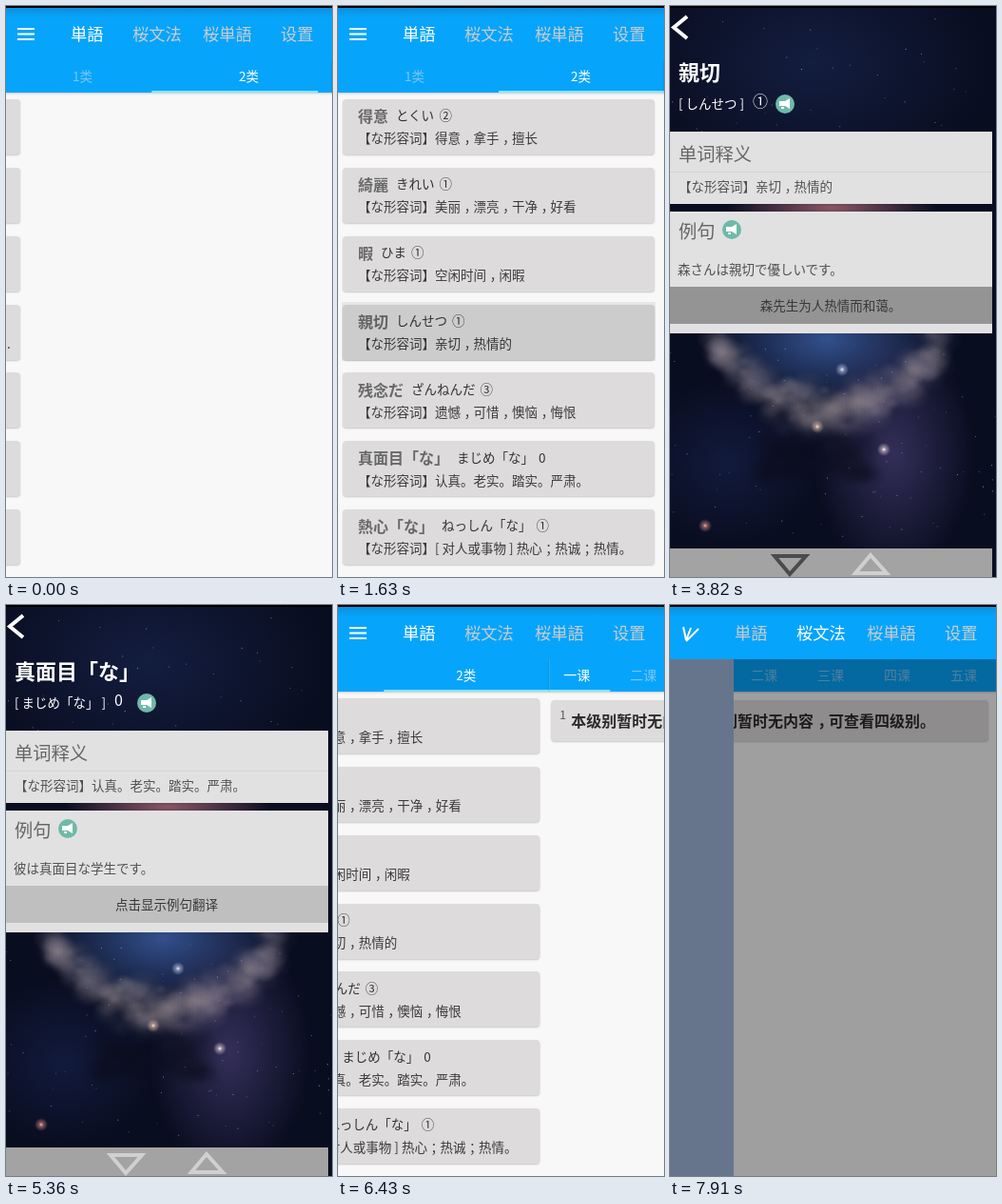
These frames come from a looping animation (343 by 600 pixels, 8000 ms). An HTML page with a canvas:

```html
<!DOCTYPE html>
<html lang="zh">
<head>
<meta charset="utf-8">
<title>Vocabulary app</title>
<style>
html, body { margin: 0; width: 100%; height: 100%; overflow: hidden; background: #f8f8f8; }
body { position: relative; font-family: "Noto Sans CJK SC", "Noto Sans CJK JP", "Noto Sans CJK", sans-serif; }
div, svg, canvas { position: absolute; }
.page { left: 0; top: 0; width: 343px; height: 600px; }
.t { white-space: pre; line-height: 20px; }
.t i { font-style: normal; position: relative; left: .27em; }
.bar { left: 0; width: 343px; background: #07a4fb; }
.card { background: #dddbdc; border-radius: 4px; box-shadow: 0 1px 2px #0003; }
.line { top: 89px; height: 2px; background: #86e6ff; }
.panel { left: 0; width: 339px; background: #e2e1e2; }
</style>
</head>
<body>
<script>
const STEPS = [0, 120, 270, 390, 550, 1630, 1940, 2090, 2240, 2360, 2520, 2790, 2910, 3030, 3150,
  3270, 3420, 3820, 4090, 4370, 4800, 5360, 5630, 5750, 5880, 6000, 6310, 6430, 6550, 6670, 6790,
  6940, 7090, 7360, 7640, 7790, 7910];
const LOOP = 8000, W = 343;
const ROWS = [
  ['得意', 'とくい', '②', '得意，拿手，擅长'],
  ['綺麗', 'きれい', '①', '美丽，漂亮，干净，好看'],
  ['暇', 'ひま', '①', '空闲时间，闲暇'],
  ['親切', 'しんせつ', '①', '亲切，热情的'],
  ['残念だ', 'ざんねんだ', '③', '遗憾，可惜，懊恼，悔恨'],
  ['真面目「な」', 'まじめ「な」', '0', '认真。老实。踏实。严肃。'],
  ['熱心「な」', 'ねっしん「な」', '①', '[ 对人或事物 ] 热心；热诚；热情。']
];
const EXAMPLES = ['森さんは親切で優しいです。', '試合に負けて残念だ。', '彼は真面目な学生です。'];

function add(parent, cls, css = '', html = '') {
  const el = document.createElement('div');
  el.className = cls;
  el.style.cssText = css;
  el.innerHTML = html;
  parent.append(el);
  return el;
}
const box = (p, cls, x, y, w, h, css = '') =>
  add(p, cls, `left:${x}px;top:${y}px;width:${w}px;height:${h}px;${css}`);
// Text starting at x, vertically centred on y
const text = (p, x, y, size, color, str, css = '') =>
  add(p, 't', `left:${x}px;top:${y - 10 - size * .05}px;font-size:${size}px;color:${color};${css}`,
    str.replace(/[，；]/g, '<i>$&</i>'));
const svg = (p, html) => {
  p.insertAdjacentHTML('beforeend',
    `<svg style="left:0;top:0" width="343" height="600" fill="none">${html}</svg>`);
  return p.lastElementChild;
};
const show = (el, on) => { el.style.display = on ? '' : 'none'; };
const moveX = (el, x) => { el.style.transform = `translateX(${x}px)`; };

const home = add(document.body, 'page', 'background:#f8f8f8;overflow:hidden');

// Word list section
const words = add(home, 'page');
const oldList = add(words, 'page'), newList = add(words, 'page');
let highlight;
ROWS.forEach(([word, kana, tone, meaning], i) => {
  const y = 98 + i * 71.85;
  box(oldList, 'card', 5, y, 328, 58);
  box(newList, 'card', 5, y, 328, 58);
  const kanaX = 29 + word.length * 16;
  text(newList, 21, y + 18, 16, '#686868', word, 'font-weight:700');
  text(newList, kanaX, y + 17, 13.5, '#333', kana);
  text(newList, kanaX + kana.length * 13.5 + 5, y + 17, 13.5, '#333', tone);
  text(newList, 21, y + 41, 13.5, '#3a3a3a', '【な形容词】' + meaning);
});
text(oldList, 319, 355, 13.5, '#333', '.');
highlight = box(newList, '', 4, 311, 330, 62, 'background:#0a0a0012');
box(words, 'bar', 0, 57, W, 34, 'box-shadow:0 1px 2px #0003');
const classTabs = [[70, '1类'], [245, '2类']].map(([x, s]) => text(words, x, 74, 13.5, '#fff', s));
classTabs[0].style.color = '#7cc6f3';
const line = box(words, 'line', 0, 89, 175, 2);

// Grammar section
const grammar = add(home, 'page');
box(grammar, 'card', 2, 100, 333, 43);
text(grammar, 11, 116, 12, '#555', '1');
text(grammar, 23, 122, 16, '#2b2b2b', '本级别暂时无内容，可查看四级别。', 'font-weight:700');
const loader = box(grammar, '', 149, 102, 40, 40, 'border-radius:50%;background:#f9f8f8;box-shadow:0 1px 2px #0004');
box(grammar, 'bar', 0, 57, W, 34, 'box-shadow:0 1px 2px #0003');
[...'一二三四五'].forEach((n, i) => text(grammar, 15 + i * 70, 74, 14, i ? '#7cc6f3' : '#fff', n + '课'));
box(grammar, 'line', 0, 89, 64, 2);

// Drawer and top bar
const scrim = box(home, '', 0, 57, W, 543, 'background:#000');
const drawer = box(home, '', 0, 57, 67, 543, 'background:#66758c');
box(home, 'bar', 0, 0, W, 57, 'background:linear-gradient(#000 2px,#0b90dd 2px,#07a4fb 12px)');
const tabs = [[68, '単語'], [133, '桜文法'], [207, '桜単語'], [289, '设置']]
  .map(([x, s]) => text(home, x, 30, 17.3, '#c9cdd0', s));
const menu = svg(home, '<path stroke="#fff" stroke-width="2"/>').firstChild;

// Word detail screen
const detail = add(document.body, 'page', 'overflow:hidden;background:#070a1a');
drawSky();
svg(detail, '<path d="M18 11L4 22.5L18 34" stroke="#fff" stroke-width="4"/>');
box(detail, 'panel', 0, 132, 339, 76);
box(detail, '', 0, 174, 339, 1, 'background:#d6d5d6');
box(detail, 'panel', 0, 216, 339, 128);
text(detail, 9, 156, 19.3, '#666', '单词释义');
text(detail, 9, 237, 19.3, '#666', '例句');
const button = box(detail, '', 0, 295, 339, 39);
const label = text(detail, 0, 315, 13.5, '#383838', '', 'width:338px;text-align:center');
box(detail, '', 0, 570, 339, 30, 'background:#a3a3a3');
const speaker = (x, y) => `<g transform="translate(${x} ${y})"><circle r="10" fill="#6fb9a9"/>
  <path d="M-6-3L0-3L5-6V5L0 2L-6 2ZM-4 3H-1V5H-4Z" fill="#fff"/></g>`;
svg(detail, speaker(65, 235));
const arrows = svg(detail, `<g stroke-width="4"><path d="M110 578H143L126 597Z"/>
  <path d="M195 596H228L211 577Z" stroke="#d0d0d0"/></g>`).querySelectorAll('path');
const entries = EXAMPLES.map((example, i) => {
  const [word, kana, tone, meaning] = ROWS[3 + i];
  const p = add(detail, 'page'), toneX = 33 + kana.length * 13.5;
  text(p, 9, 69, 22, '#fff', word, 'font-weight:700');
  text(p, 9, 103, 13.5, '#fff', `[ ${kana} ]`);
  text(p, toneX, 100, 16, '#fff', tone);
  text(p, 9, 190, 13.5, '#505050', '【な形容词】' + meaning);
  text(p, 8, 277, 13.5, '#505050', example);
  svg(p, speaker(toneX + 34, 103));
  return p;
});

function drawSky() {
  const cv = document.createElement('canvas');
  cv.width = W; cv.height = 600;
  detail.append(cv);
  const c = cv.getContext('2d');
  let seed = 7;
  const rnd = () => (seed = seed * 16807 % 2147483647) / 2147483647;
  const glow = (x, y, rx, ry, rgb, a) => {
    const g = c.createRadialGradient(0, 0, 0, 0, 0, 1);
    g.addColorStop(0, `rgba(${rgb},${a})`);
    g.addColorStop(1, `rgba(${rgb},0)`);
    c.save();
    c.translate(x, y);
    c.scale(rx, ry);
    c.fillStyle = g;
    c.fillRect(-1, -1, 2, 2);
    c.restore();
  };
  c.fillStyle = '#090d20';
  c.fillRect(0, 0, W, 600);
  glow(150, 60, 190, 130, '26,40,84', .6);
  glow(170, 212, 110, 20, '170,105,120', .8);
  glow(165, 350, 130, 75, '58,92,160', .85);
  glow(235, 470, 85, 130, '66,58,108', .75);
  glow(60, 480, 100, 90, '22,32,72', .7);
  // Bright rim of the nebula
  for (let i = 0; i < 260; i++) {
    const x = 45 + rnd() * 245, u = (x - 165) / 115;
    const y = 424 - u * u * 65 + (rnd() + rnd() - 1) * 28, r = 7 + rnd() * 15;
    glow(x, y, r, r * .8, rnd() < .6 ? '160,146,148' : '104,100,126', .16);
  }
  for (let i = 0; i < 45; i++) glow(95 + rnd() * 115, 455 + rnd() * 40, 18, 14, '10,10,26', .25);
  for (let i = 0; i < 170; i++) {
    c.fillStyle = `rgba(205,215,255,${.15 + rnd() * .5})`;
    c.fillRect(rnd() * W, rnd() * 600, 1, 1);
  }
  [[225, 466, '255,240,240'], [155, 442, '255,215,190'], [37, 546, '255,160,150'], [181, 382, '225,230,255']]
    .forEach(([x, y, rgb]) => { glow(x, y, 7, 7, rgb, .7); glow(x, y, 2, 2, rgb, 1); });
  c.fillStyle = '#000';
  c.fillRect(0, 0, W, 2);
}

function render(time) {
  // The screen holds its picture between refreshes
  const t = STEPS.findLast(s => s <= time);

  const arrive = 1 - .09 * (1 - Math.min(t / 390, 1)) ** 2;
  moveX(line, -6 + 175 * arrive);
  moveX(oldList, -318);
  show(oldList, t < 120);
  show(newList, t >= 550);
  show(highlight, t === 1630);

  const k = Math.max(0, Math.min((t - 6190) / 600, 1)), swipe = k * k * (3 - 2 * k);
  moveX(words, -W * swipe);
  moveX(grammar, W * (1 - swipe));
  tabs.forEach((tab, i) => { tab.style.color = i === (swipe > .5 ? 1 : 0) ? '#fff' : '#c9cdd0'; });
  show(loader, t >= 6670 && t < 6940);

  const open = t >= 7910 ? 1 : t >= 7790 ? .35 : 0;
  scrim.style.opacity = .36 * open;
  moveX(drawer, 67 * (open - 1));
  menu.setAttribute('d', open === 1 ? 'M14 23L17 37M22 24L17 37M30 25L17 38'
    : open ? 'M14 21L29 30M13 26L27 34M12 31L25 38' : 'M12 24H30M12 29.5H30M12 35H30');

  show(detail, t >= 2090 && t < 5880);
  moveX(detail, t < 2240 ? 21 : t < 5630 ? 0 : t < 5750 ? 145 : 300);
  const index = t < 4090 ? 0 : t < 4800 ? 1 : 2;
  entries.forEach((e, i) => show(e, i === index));
  const translated = t >= 3270 && t < 4090;
  button.style.background = t >= 3030 && t < 4090 ? '#949494' : '#bfbfbf';
  label.textContent = translated ? '森先生为人热情而和蔼。' : '点击显示例句翻译';
  arrows[0].setAttribute('stroke', t >= 3820 && t < 4370 ? '#4b4b4b' : '#d0d0d0');
}

const start = performance.now();
(function tick() {
  render((performance.now() - start) % LOOP);
  requestAnimationFrame(tick);
})();
</script>
</body>
</html>
```
